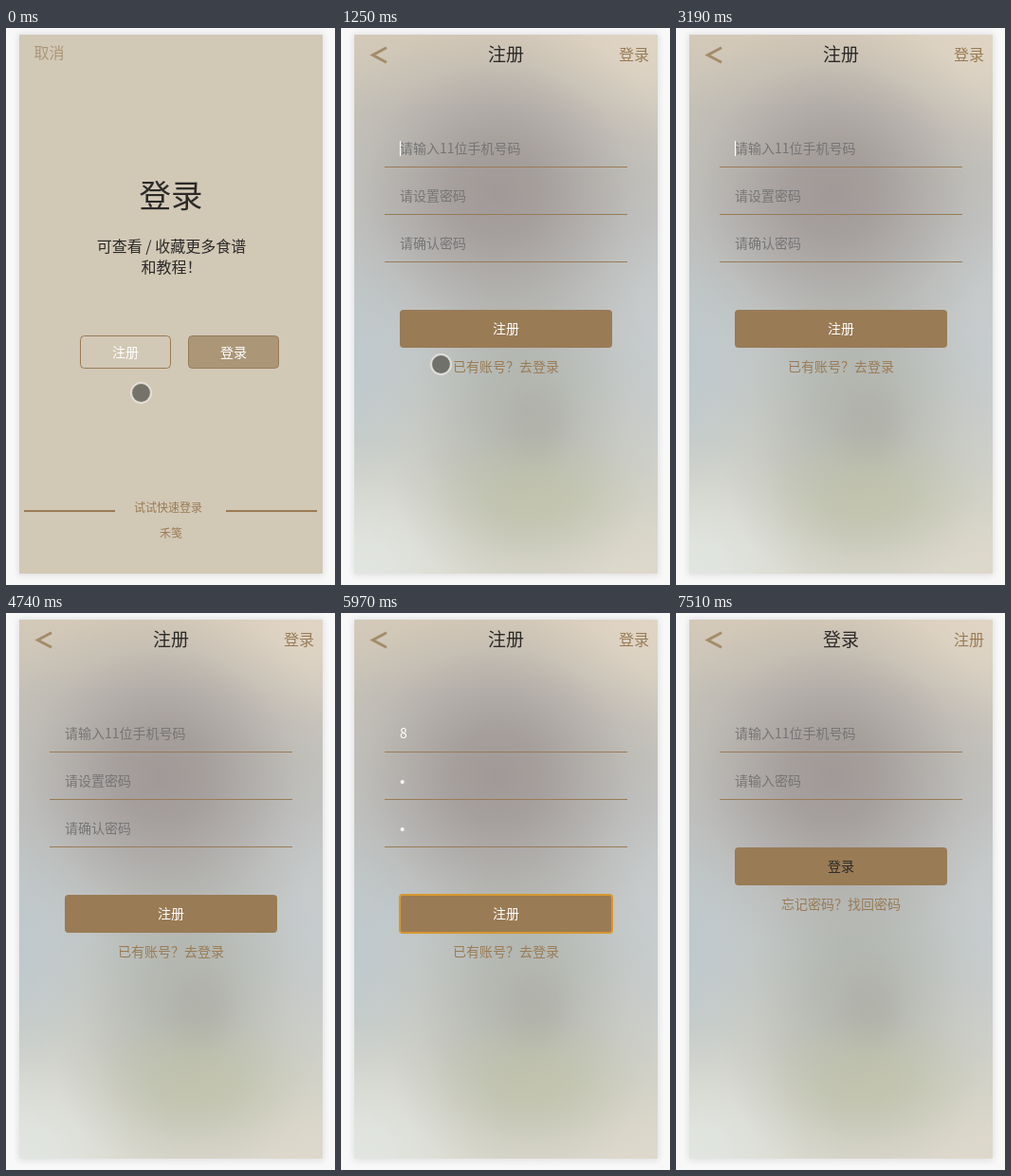
An HTML page that plays this animation: 347 px wide and 587 px high, repeating every 8 s.

```html
<!DOCTYPE html>
<html lang="zh-CN">
<head>
<meta charset="utf-8">
<title>登录与注册</title>
<style>
html, body { margin: 0; width: 100%; height: 100%; overflow: hidden; background: #f8f8f9; }
svg { display: block; width: 347px; height: 587px; }
text { font-family: "Noto Sans CJK SC", "Noto Sans CJK", "Noto Sans", sans-serif; font-size: 14px; fill: #997b55; }
.mid { text-anchor: middle; }
.hint { fill: #757575; }
.bold { font-weight: 500; }
.white { fill: #fff; }
.dark { fill: #2b2a28; }
</style>
</head>
<body>
<svg viewBox="0 0 347 587" xmlns="http://www.w3.org/2000/svg">
  <defs id="defs">
    <filter id="soft" x="-10%" y="-10%" width="120%" height="120%"><feGaussianBlur stdDeviation="3.5"/></filter>
    <clipPath id="phone"><rect x="14" y="7" width="320" height="568"/></clipPath>
    <linearGradient id="base" x1="0" y1="0" x2="0" y2="1">
      <stop offset="0" stop-color="#d4c9b8"/>
      <stop offset=".14" stop-color="#c5c2b9"/>
      <stop offset=".35" stop-color="#c2c3c1"/>
      <stop offset=".6" stop-color="#c5caca"/>
      <stop offset=".8" stop-color="#cfd0c9"/>
      <stop offset="1" stop-color="#d9d7cb"/>
    </linearGradient>
  </defs>
  <rect x="13" y="6" width="322" height="571" fill="#000" opacity=".1" filter="url(#soft)"/>

  <g id="welcome">
    <rect x="14" y="7" width="320" height="568" fill="#d2c8b6"/>
    <text x="29.5" y="32" style="font-size:16px;fill:#ab9678">取消</text>
    <text class="mid dark" x="174" y="189" style="font-size:33.5px">登录</text>
    <text class="mid dark" x="174.5" y="236" style="font-size:16px">可查看 / 收藏更多食谱</text>
    <text class="mid dark" x="174.5" y="258" style="font-size:16px">和教程！</text>
    <g stroke="#997b55">
      <rect x="78.5" y="324.5" width="95" height="34" rx="4" fill="none"/>
      <rect x="192.5" y="324.5" width="95" height="34" rx="4" fill="#ab9678"/>
      <path d="M19 509H115M232 509H328" stroke-width="2"/>
    </g>
    <text class="mid bold white" x="126" y="347">注册</text>
    <text class="mid bold white" x="240" y="347">登录</text>
    <text class="mid" x="171" y="510" style="font-size:12px">试试快速登录</text>
    <text class="mid" x="174" y="537" style="font-size:12px">禾笺</text>
  </g>

  <g id="form">
    <g id="backdrop" clip-path="url(#phone)">
      <rect x="14" y="7" width="320" height="568" fill="url(#base)"/>
    </g>
    <path d="M48 20.7L33.5 28.5L48 36.3" fill="none" stroke="#a48c6a" stroke-width="3"/>
    <text id="title" class="mid dark" x="174" y="35" style="font-size:19px"></text>
    <text id="other" x="293" y="34" style="font-size:16px"></text>
    <path d="M46 146.5H302M46 196.5H302" stroke="#997b55"/>
    <path id="line3" d="M46 246.5H302" stroke="#997b55"/>
    <text id="in1" x="62" y="132"></text>
    <text id="in2" class="hint" x="62" y="182"></text>
    <text id="in3" class="hint" x="62" y="232">请确认密码</text>
    <circle id="dot2" cx="64.7" cy="178" r="2" fill="#fff"/>
    <circle id="dot3" cx="64.7" cy="228" r="2" fill="#fff"/>
    <rect id="caret" width="1" height="16" fill="#fff"/>
    <g id="submit">
      <rect x="62" y="297" width="224" height="40" rx="4" fill="#997b55"/>
      <rect id="ring" x="62" y="297" width="224" height="40" rx="3" fill="none" stroke="#d6982f" stroke-width="2"/>
      <text id="label" x="174" y="322"></text>
      <text id="link" class="mid" x="174" y="362"></text>
    </g>
  </g>

  <circle id="touch" r="10.4" fill="#55554f" fill-opacity=".75" stroke="#ebe8e0" stroke-opacity=".85" stroke-width="2"/>
  <path id="arrow" transform="translate(105.5 354.5)" d="M0 0V16L3.7 12.6L6.4 18.4L8.9 17.3L6.3 11.6H11.2Z" fill="#fff" stroke="#111" stroke-linejoin="round"/>
</svg>
<script>
const LOOP = 8000;
const $ = id => document.getElementById(id);
const show = (id, on) => $(id).style.display = on ? "" : "none";
const write = (id, text) => { if ($(id).textContent !== text) $(id).textContent = text; };

function make(parent, tag, attrs) {
  const el = document.createElementNS("http://www.w3.org/2000/svg", tag);
  for (const key in attrs) el.setAttribute(key, attrs[key]);
  return parent.appendChild(el);
}

// Soft colour clouds: cx, cy, rx, ry, colour, strength
[
  [334, 7, 190, 150, "#e2d7c7", .85],
  [14, 360, 90, 170, "#bac7cd", .55],
  [334, 320, 80, 160, "#c9cdd0", .6],
  [14, 575, 170, 140, "#e3e8e5", .85],
  [334, 575, 120, 110, "#e0d9cc", .6],
  [190, 400, 150, 210, "#adb0a8", .8],
  [205, 495, 150, 90, "#c0c3a6", .6],
  [165, 172, 190, 185, "#a09997", 1],
  [206, 415, 52, 62, "#adaca3", .5]
].forEach(([cx, cy, rx, ry, color, strength], i) => {
  const grad = make($("defs"), "radialGradient", { id: "cloud" + i });
  for (const r of [0, .25, .5, .75, 1]) {
    make(grad, "stop", {
      offset: r, "stop-color": color,
      "stop-opacity": strength * (1 + Math.cos(Math.PI * r)) / 2
    });
  }
  make($("backdrop"), "ellipse", { cx, cy, rx, ry, fill: `url(#cloud${i})` });
});

// Latest step whose start time has passed
const at = (steps, t) => steps.filter(s => s[0] <= t).pop();

// start, x, y
const TOUCH = [
  [0, 142.5, 384.5], [160, 138.5, 383.5], [310, 105.5, 352.5],
  [580, 105.5, 354.5], [1130], [1250, 105.5, 354.5], [2640]
];
const CARET = [
  [0], [1250, 62, 119], [1710], [2240, 62, 119], [2640], [3190, 62, 119],
  [3750], [4150, 62, 119], [4740], [4890, 70, 119], [5140, 62, 169],
  [5260, 67, 169], [5410, 62, 219], [5840, 67, 219], [5970],
  [7060, 62, 119], [7510]
];

function draw(t) {
  const login = t >= 7060;
  const typed = start => t >= start && !login;

  show("welcome", t < 1250);
  show("form", t >= 1250);
  show("arrow", t >= 1130 && t < 1250);

  const [, tx, ty] = at(TOUCH, t);
  show("touch", tx !== undefined);
  if (tx) $("touch").setAttribute("transform", `translate(${tx} ${ty})`);

  const [, cx, cy] = at(CARET, t);
  show("caret", cx !== undefined);
  if (cx) $("caret").setAttribute("transform", `translate(${cx} ${cy})`);

  write("title", login ? "登录" : "注册");
  write("other", login ? "注册" : "登录");
  write("in1", typed(4890) ? "8" : "请输入11位手机号码");
  $("in1").setAttribute("class", typed(4890) ? "white" : "hint");
  write("in2", login ? "请输入密码" : "请设置密码");
  show("in2", !typed(5260));
  show("dot2", typed(5260));
  show("in3", t < 5840);
  show("dot3", typed(5840));
  show("line3", !login);

  $("submit").setAttribute("transform", `translate(0 ${login ? -50 : 0})`);
  show("ring", typed(5970));
  write("label", login ? "登录" : "注册");
  $("label").setAttribute("class", "mid bold " + (login ? "dark" : "white"));
  write("link", login ? "忘记密码？找回密码" : "已有账号？去登录");
}

const begin = performance.now();
function tick() {
  draw((performance.now() - begin) % LOOP);
  requestAnimationFrame(tick);
}
tick();
</script>
</body>
</html>
```
